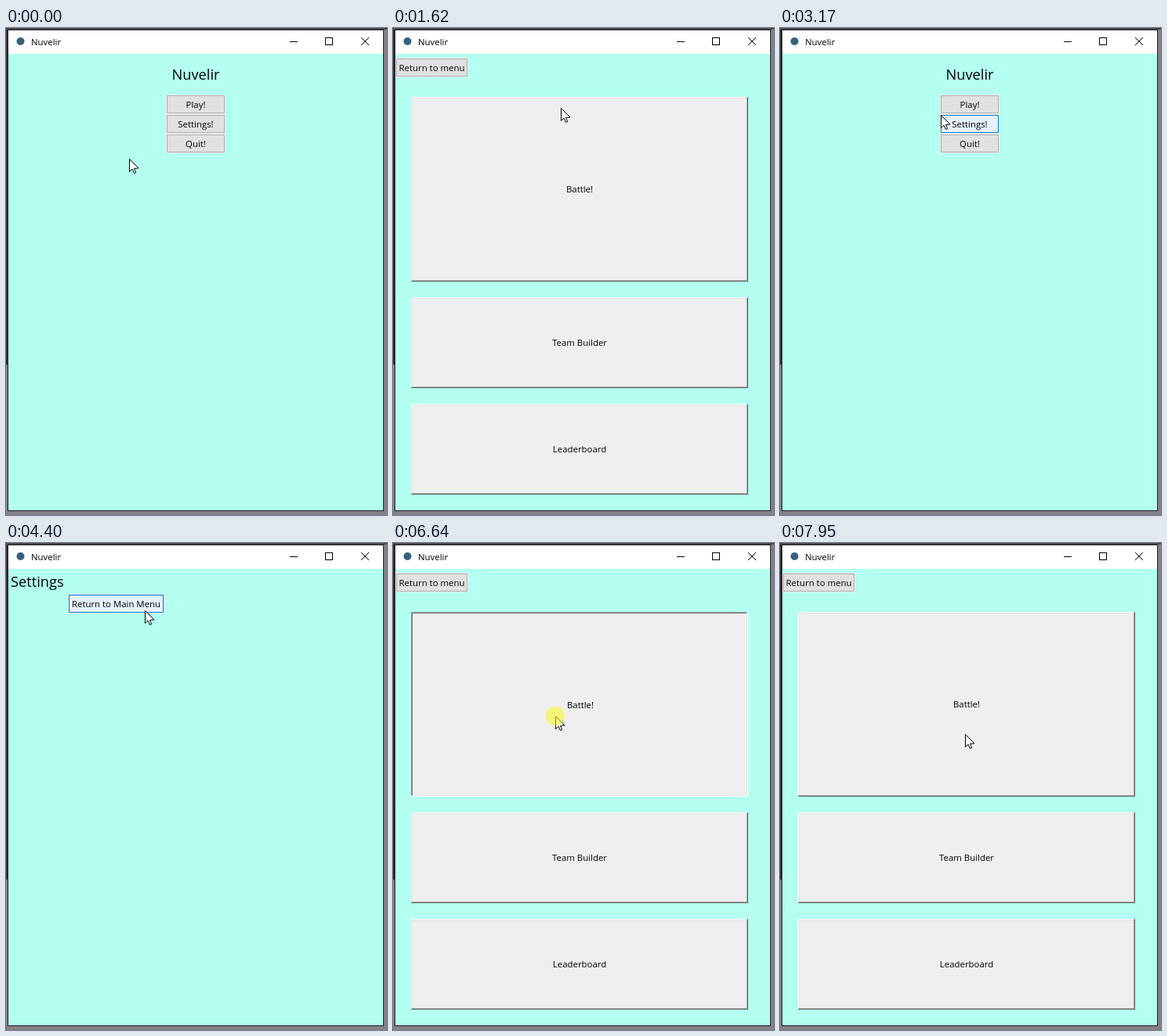
Recreate the animation shown at these times as an HTML page with a canvas. Size 486 by 622 pixels, loop 8 s.

```html
<!DOCTYPE html>
<html lang="en">
<head>
<meta charset="utf-8">
<title>Nuvelir</title>
<style>
  html, body { margin: 0; width: 100%; height: 100%; overflow: hidden; background: #857f86; }
  canvas { display: block; }
</style>
</head>
<body>
<canvas id="stage" width="486" height="622"></canvas>
<script>
const ctx = document.getElementById('stage').getContext('2d');
const LOOP = 8000;
const HOLD = 140;   // how long a click is held down
const PAUSE = 80;   // rest before and after each click
const NAME = 'Nuvelir';

// The pointer glides from one click to the next; releasing a click opens its screen.
const visits = [
  { at: 0, x: 157, y: 167, opens: menu, idle: true },
  { at: 1190, x: 230, y: 107, opens: play },
  { at: 2510, x: 81, y: 58, opens: menu },
  { at: 3430, x: 236, y: 124, opens: settings },
  { at: 4475, x: 177, y: 86, opens: menu },
  { at: 5210, x: 232, y: 96, opens: play },
  { at: 6560, x: 207, y: 221, opens: play },
  { at: LOOP, x: 236, y: 244, idle: true }
];

const clamp01 = v => Math.min(1, Math.max(0, v));
const ease = p => p * p * (3 - 2 * p);

function stateAt(t) {
  const i = visits.findIndex(v => v.at > t);
  const from = visits[i - 1], to = visits[i];
  const start = from.at + HOLD + PAUSE, end = to.at - PAUSE;
  const e = ease(clamp01((t - start) / (end - start)));
  const held = t < from.at + HOLD;
  return {
    x: Math.round(from.x + (to.x - from.x) * e),
    y: Math.round(from.y + (to.y - from.y) * e),
    down: held && !from.idle,
    screen: held && !from.idle ? visits[i - 2].opens : from.opens
  };
}

function fill(color, x, y, w, h) {
  ctx.fillStyle = color;
  ctx.fillRect(x, y, w, h);
}

function frame(color, x, y, w, h) {
  ctx.strokeStyle = color;
  ctx.strokeRect(x + .5, y + .5, w - 1, h - 1);
}

function text(str, x, y, size = 11.4, align = 'center') {
  ctx.font = size + 'px "Open Sans", "Noto Sans", sans-serif';
  ctx.textAlign = align;
  ctx.fillStyle = '#000';
  ctx.fillText(str, x, y);
}

function path(...points) {
  ctx.beginPath();
  points.forEach(([x, y]) => ctx.lineTo(x, y));
}

function disc(color, x, y, r) {
  ctx.fillStyle = color;
  ctx.beginPath();
  ctx.arc(x, y, r, 0, 2 * Math.PI);
  ctx.fill();
}

const inside = (m, x, y, w, h) => m.x >= x && m.x < x + w && m.y >= y && m.y < y + h;

function flatButton(m, label, x, y, w) {
  const h = 23, hover = inside(m, x, y, w, h), pressed = hover && m.down;
  fill('#f0f0f0', x - 1, y - 1, w + 2, h + 2);
  fill(pressed ? '#cce4f7' : hover ? '#e5f1fb' : '#e1e1e1', x, y, w, h);
  frame(pressed ? '#005499' : hover ? '#0078d7' : '#adadad', x, y, w, h);
  if (pressed) {
    ctx.setLineDash([1, 1]);
    frame('#222', x + 2, y + 2, w - 4, h - 4);
    ctx.setLineDash([]);
  }
  text(label, x + w / 2, y + 16);
}

function bevel(x, y, w, h, topLeft, bottomRight) {
  fill(bottomRight, x, y, w, h);
  fill(topLeft, x, y, w - 1, h - 1);
}

function raisedButton(m, label, y, h) {
  const x = 23, w = 430, pressed = m.down && inside(m, x, y, w, h);
  const shift = pressed ? 1 : 0;
  const outer = ['#fff', '#696969'], inner = ['#e3e3e3', '#a0a0a0'];
  if (pressed) {
    bevel(x, y, w, h, inner[1], outer[0]);
    bevel(x + 1, y + 1, w - 2, h - 2, outer[1], inner[0]);
  } else {
    bevel(x, y, w, h, ...outer);
    bevel(x + 1, y + 1, w - 2, h - 2, ...inner);
  }
  fill('#efefef', x + 2, y + 2, w - 4, h - 4);
  text(label, x + w / 2 + shift, y + h / 2 + 4 + shift);
}

function menu(m) {
  text(NAME, 242, 66, 18.3);
  ['Play!', 'Settings!', 'Quit!'].forEach((label, i) => flatButton(m, label, 205, 86 + 25 * i, 74));
}

function play(m) {
  flatButton(m, 'Return to menu', 4, 39, 91);
  raisedButton(m, 'Battle!', 88, 236);
  raisedButton(m, 'Team Builder', 344, 116);
  raisedButton(m, 'Leaderboard', 480, 116);
}

function settings(m) {
  text('Settings', 6, 56, 18.3, 'left');
  flatButton(m, 'Return to Main Menu', 80, 66, 121);
}

function desktop() {
  fill('#857f86', 0, 0, 486, 622);
  fill('#352d32', 0, 0, 3, 430);
  fill('#4d464a', 0, 0, 486, 2);
}

function appWindow() {
  fill('#1d2024', 2, 2, 480, 615);
  fill('#fff', 3, 3, 478, 30);
  fill('#b3fff0', 3, 33, 478, 583);
  disc('#35617f', 18.5, 17, 5);
  text(NAME, 32, 22, 11.4, 'left');
  fill('#000', 362, 17, 10, 1);
  frame('#000', 407, 12, 10, 10);
  path([453, 12], [463, 22]);
  ctx.stroke();
  path([463, 12], [453, 22]);
  ctx.stroke();
}

function pointer({ x, y, down }) {
  ctx.save();
  ctx.translate(x + .5, y + .5);
  path([0, 0], [0, 16], [3.6, 12.6], [6, 18], [8.2, 17.2], [6, 12], [11.5, 11.5]);
  ctx.closePath();
  ctx.fillStyle = '#fff';
  ctx.fill();
  ctx.strokeStyle = '#000';
  ctx.stroke();
  ctx.restore();
  // The click highlight tints the pointer as well.
  if (down) disc('rgba(255, 247, 0, .5)', x, y, 12);
}

function draw() {
  const state = stateAt(performance.now() % LOOP);
  desktop();
  appWindow();
  state.screen(state);
  pointer(state);
  requestAnimationFrame(draw);
}
draw();
</script>
</body>
</html>
```
